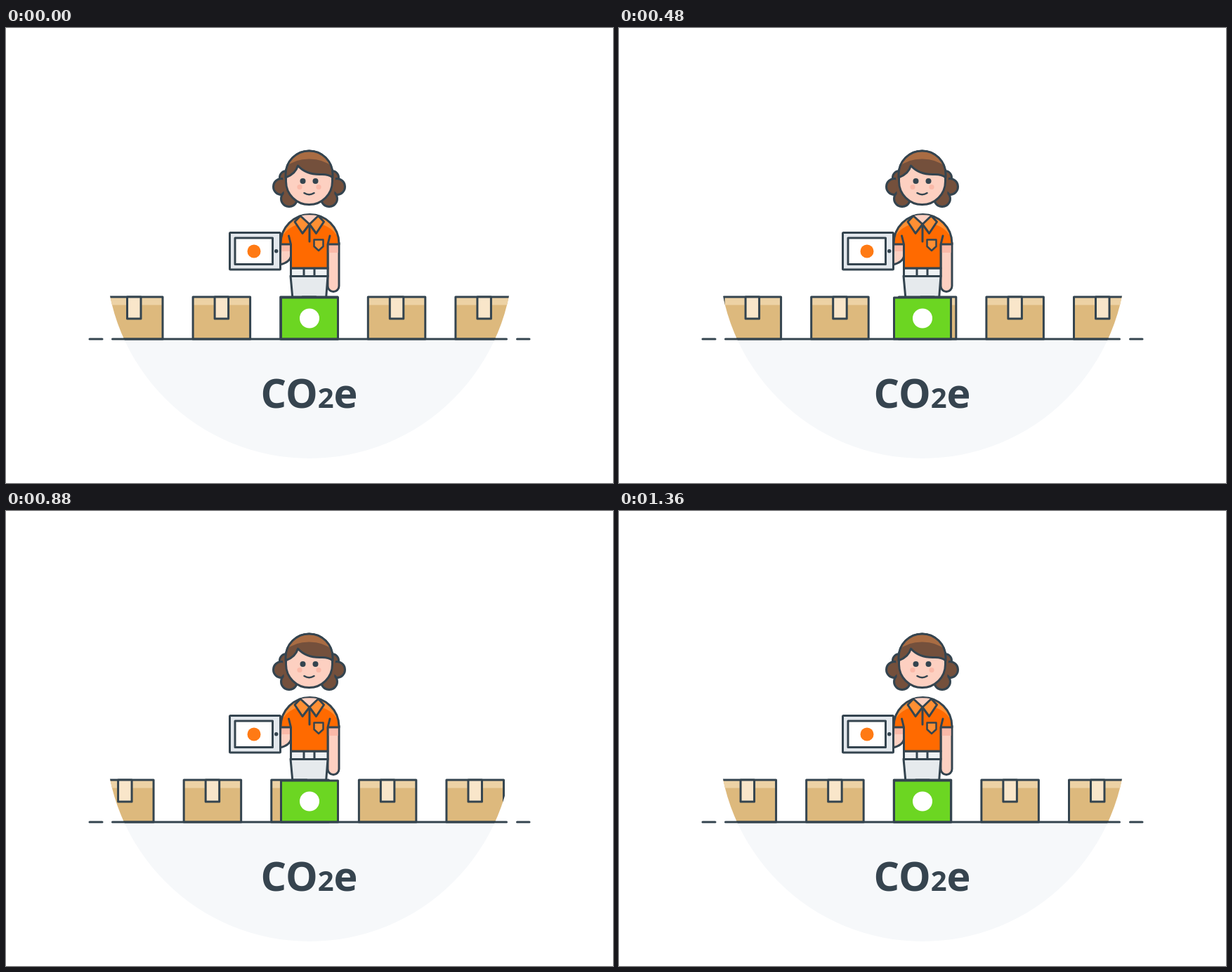
Recreate the animation shown at these times as an HTML page. Size 864 px wide and 648 px high, loop 1440 ms.

```html
<!DOCTYPE html>
<html lang="en">
<head>
<meta charset="utf-8">
<title>Packing line</title>
<style>
  html, body { margin: 0; width: 100%; height: 100%; overflow: hidden; background: #fff; }
  svg { display: block; width: 100vw; height: 100vh; }
  .ink { stroke: #34444f; stroke-width: 3; stroke-linejoin: round; stroke-linecap: round; }
  .thin { stroke-width: 2.5; }
  .line { fill: none; }
  .skin { fill: #fdd0c1; }
  .shade { fill: #fab9a8; }
  .hair { fill: #74503c; }
  .shirt { fill: #ff6a00; }
  .light { fill: #ff8f33; }
  .pale { fill: #e6eaed; }
  .dark { fill: #34444f; }
  text { font: 700 57.5px "Open Sans", "Noto Sans", sans-serif; fill: #36444f; }
  .sub { font-size: 40px; }
</style>
</head>
<body>
<svg viewBox="0 0 864 648">
  <defs>
    <clipPath id="disc"><circle cx="432" cy="323" r="290"/></clipPath>
    <clipPath id="floor"><rect y="443" width="864" height="205"/></clipPath>
    <clipPath id="cap"><circle cx="431.5" cy="208.5" r="33.5"/></clipPath>
    <g id="box">
      <rect width="81.5" height="60" fill="#ddb97d"/>
      <rect width="81.5" height="11.5" fill="#edd2a5"/>
      <rect class="ink line" width="81.5" height="60"/>
      <rect class="ink" x="31" width="19.5" height="31" fill="#f9e6ca"/>
    </g>
    <g id="curls" class="ink hair">
      <circle cx="399" cy="213" r="9.5"/>
      <circle cx="392" cy="226" r="11.5"/>
      <circle cx="403" cy="243" r="11.5"/>
      <path stroke="none" d="M394 212H412V240H396Z"/>
    </g>
  </defs>

  <circle cx="432" cy="323" r="290" fill="#f6f8fa" clip-path="url(#floor)"/>

  <!-- head -->
  <use href="#curls"/>
  <use href="#curls" transform="matrix(-1 0 0 1 863 0)"/>
  <path class="ink skin" d="M398.5 208A33 33 0 0 1 464.5 208V218.5A33 33 0 0 1 398.5 218.5Z"/>
  <g class="shade"><circle cx="418" cy="226.5" r="3.6"/><circle cx="445" cy="226.5" r="3.6"/></g>
  <path class="hair" d="M398 213Q412 208 415.5 196Q427 209 448 208.5Q459 208 465 213V208A33.5 33.5 0 0 0 398 208Z"/>
  <path clip-path="url(#cap)" fill="#a96c43" d="M396 174H467V200Q454 186.5 431.5 186.5T396 200Z"/>
  <path class="ink line" d="M398 213V208.5A33.5 33.5 0 0 1 465 208.5V213Q459 208 448 208.5Q427 209 415.5 196Q412 208 398 213"/>
  <g class="dark"><circle cx="422.5" cy="218" r="4"/><circle cx="440.5" cy="218" r="4"/></g>
  <path class="ink line thin" d="M424.5 235Q431.5 239.5 438.5 235"/>

  <!-- arms -->
  <path class="ink skin" d="M391 306H406V324Q404 334 390 337Z"/>
  <path class="shade" d="M392.5 309H404.5V318H392.5Z"/>
  <path class="ink skin" d="M458 306H474V367.5A8 8 0 0 1 458 367.5Z"/>
  <path class="shade" d="M459.5 309H472.5V320H459.5Z"/>

  <!-- trousers and belt -->
  <path class="ink pale" d="M405 353H458L455.5 386H408Z"/>
  <path class="ink" fill="#eef1f3" d="M405.5 342H458V353.5H405.5ZM424 342V353.5M439 342V353.5"/>

  <!-- shirt -->
  <path class="shirt" d="M391 307A41.5 41.5 0 0 1 474 307H458V342H405.5V307Z"/>
  <path class="light" d="M391 307A41.5 41.5 0 0 1 474 307A41.5 30 0 0 0 391 307Z"/>
  <path class="ink line" d="M391 307A41.5 41.5 0 0 1 474 307V308H458V342H405.5V308H391ZM405.5 308L402.5 296M458 308L461 296"/>
  <path class="skin" d="M419 267.5Q432 265 444.5 267.5L432 279Z"/>
  <path class="ink light" d="M419 267.5L411 276L422 292.5L432 279.5ZM444.5 267.5L452.5 276L441.5 292.5L432 279.5Z"/>
  <path class="ink line" d="M432 280V304"/>
  <path class="ink light thin" d="M438.5 301.5H451.5V311L445 317L438.5 311Z"/>

  <!-- tablet -->
  <rect class="ink" x="318.5" y="291.5" width="72" height="52.5" rx="1" fill="#e3e8ed"/>
  <rect class="ink" x="326" y="299" width="53.5" height="37.5" fill="#fff"/>
  <circle class="dark" cx="384.7" cy="317.8" r="2.7"/>
  <circle cx="353" cy="318" r="9.5" fill="#ff7a14"/>

  <!-- conveyor -->
  <g clip-path="url(#disc)"><g id="row"></g></g>
  <rect class="ink" x="391.5" y="384" width="81" height="59" fill="#6cd622"/>
  <circle cx="432" cy="413.5" r="14" fill="#fff"/>
  <path class="ink line" d="M119 443H137M151.5 443H712.5M727.5 443H745"/>

  <text x="362.5" y="541">CO<tspan class="sub">2</tspan>e</text>
</svg>
<script>
  const LOOP = 1440, STEP = 80, EASE = 1462;
  const PITCH = 124.6, TRAVEL = 125.4, START = 390.7;
  const row = document.getElementById('row');

  for (let i = -3; i <= 2; i++) {
    const box = document.createElementNS('http://www.w3.org/2000/svg', 'use');
    box.setAttribute('href', '#box');
    box.setAttribute('x', START + i * PITCH);
    box.setAttribute('y', 383);
    row.append(box);
  }

  // Closed form of cubic-bezier(1, 0, 0, 1)
  function ease(x) {
    const s = (1 + Math.cbrt(2 * x - 1)) / 2;
    return s * s * (3 - 2 * s);
  }

  function draw(now) {
    const t = Math.floor((now % LOOP) / STEP) * STEP;
    row.setAttribute('transform', `translate(${TRAVEL * ease(t / EASE)} 0)`);
    requestAnimationFrame(draw);
  }
  draw(0);
</script>
</body>
</html>
```
